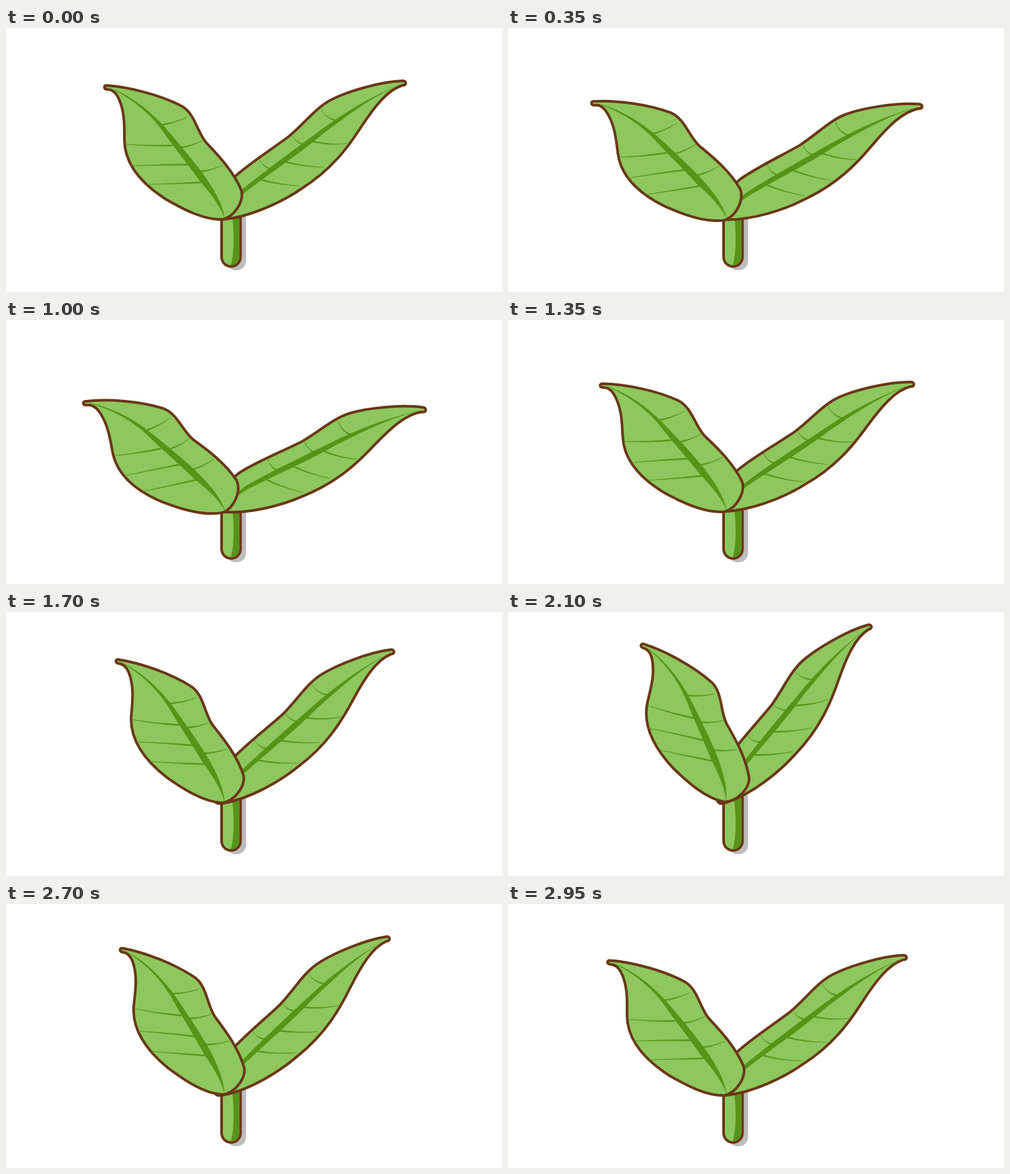
Recreate the animation shown at these times as an HTML page. Size 750x400 px, loop 3 s.

```html
<!DOCTYPE html>
<html lang="en">
<head>
<meta charset="utf-8">
<title>Sprout</title>
<style>
html, body { margin: 0; width: 100%; height: 100%; overflow: hidden; background: #fff; }
svg { display: block; }
.outline { fill: #8dc75e; stroke: #683816; stroke-width: 4; stroke-linejoin: round; }
.dark { fill: #569419; }
.vein { fill: #569419; stroke: #569419; stroke-width: .5; stroke-linejoin: round; }
</style>
</head>
<body>
<svg width="750" height="400" viewBox="0 0 750 400">
  <rect x="333" y="268" width="30" height="99" rx="14" fill="#bdbdbd"/>
  <path class="outline" d="M326 275V347A14.300 14.300 0 0 0 354.600 347V275Z"/>
  <path class="dark" d="M341 275Q348 330 340 359.300A12.600 12.600 0 0 0 352.600 347V275Z"/>
  <g id="right">
    <path class="outline" d="M600 80C565 81 515 97 493 108C469 120 452 144 428 164C400 185 368 205 345 226C330 242 315 270 315 284C316 291 322 290 327 290C368 287 417 264 446 244C492 215 517 181 537 150C558 118 577 94 599 87C606 87 606 80 600 80Z"/>
    <path class="dark" d="M600 84C555 102 515 126 478 153C440 181 396 213 358 244Q340 262 328 286Q345 263 360 250C399 220 445 190 481 159C520 130 555 103 600 84Z"/>
  </g>
  <g id="left">
    <path class="outline" d="M152 87C186 89 235 102 266 118.500C286 130 289 158 303 174C318 190 343 215 356 246C360 262 346 286 327 290C300 291 270 276 241 259C207 237 179 207 179 169C179 150 180 125 169 104C165 97 160 93 153 93C147 92 148 87 152 87Z"/>
    <path class="dark" d="M155 90C190 102 220 128 240 150C263 177 288 206 303 228C318 250 328 270 331 289C324 270 310 251 293 232C276 207 254 181 236 155C218 130 190 106 155 90Z"/>
  </g>
</svg>
<script>
const left = document.getElementById('left');
const right = document.getElementById('right');

// Side vein: wide at the midrib (x, y), thin at the leaf edge (ex, ey)
function vein(leaf, x, y, cx, cy, ex, ey) {
  const p = document.createElementNS('http://www.w3.org/2000/svg', 'path');
  p.setAttribute('class', 'vein');
  p.setAttribute('d', `M${x} ${y - 1}Q${cx} ${cy - .6} ${ex} ${ey}Q${cx} ${cy + .6} ${x} ${y + 1}Z`);
  leaf.append(p);
}

vein(left, 234, 147, 255, 144, 274, 135);
vein(left, 264, 181, 282, 179, 298, 170);
vein(left, 291, 218, 310, 216, 328, 208);
vein(left, 252, 178, 215, 179, 181, 176);
vein(left, 275, 207, 230, 207, 190, 209);
vein(left, 295, 234, 255, 236, 213, 237);
vein(right, 498, 140, 483, 136, 477, 123);
vein(right, 451, 177, 437, 173, 432, 162);
vein(right, 402, 214, 388, 211, 383, 199);
vein(right, 464, 172, 490, 178, 516, 175);
vein(right, 423, 203, 450, 210, 480, 211);
vein(right, 386, 230, 415, 238, 444, 239);

// Leaf lift: [time in ms, degrees]
const keys = [[0, 0], [750, -15.1], [1000, -10.3], [1100, -8.4], [1650, 3.8], [2100, 13.9],
  [2200, 14.8], [2250, 15.1], [2350, 14.3], [2500, 11.6], [2750, 5.4], [2950, .5], [3000, 0]];

function lift(t) {
  const i = keys.findIndex(k => k[0] > t);
  const [t0, a] = keys[i - 1], [t1, b] = keys[i];
  return a + (b - a) * (t - t0) / (t1 - t0);
}

function draw() {
  const t = Math.floor(performance.now() % 3000 / 50) * 50;
  const a = lift(t);
  left.setAttribute('transform', `rotate(${a} 336.5 284.5)`);
  right.setAttribute('transform', `rotate(${-a} 324 278)`);
  requestAnimationFrame(draw);
}
draw();
</script>
</body>
</html>
```
